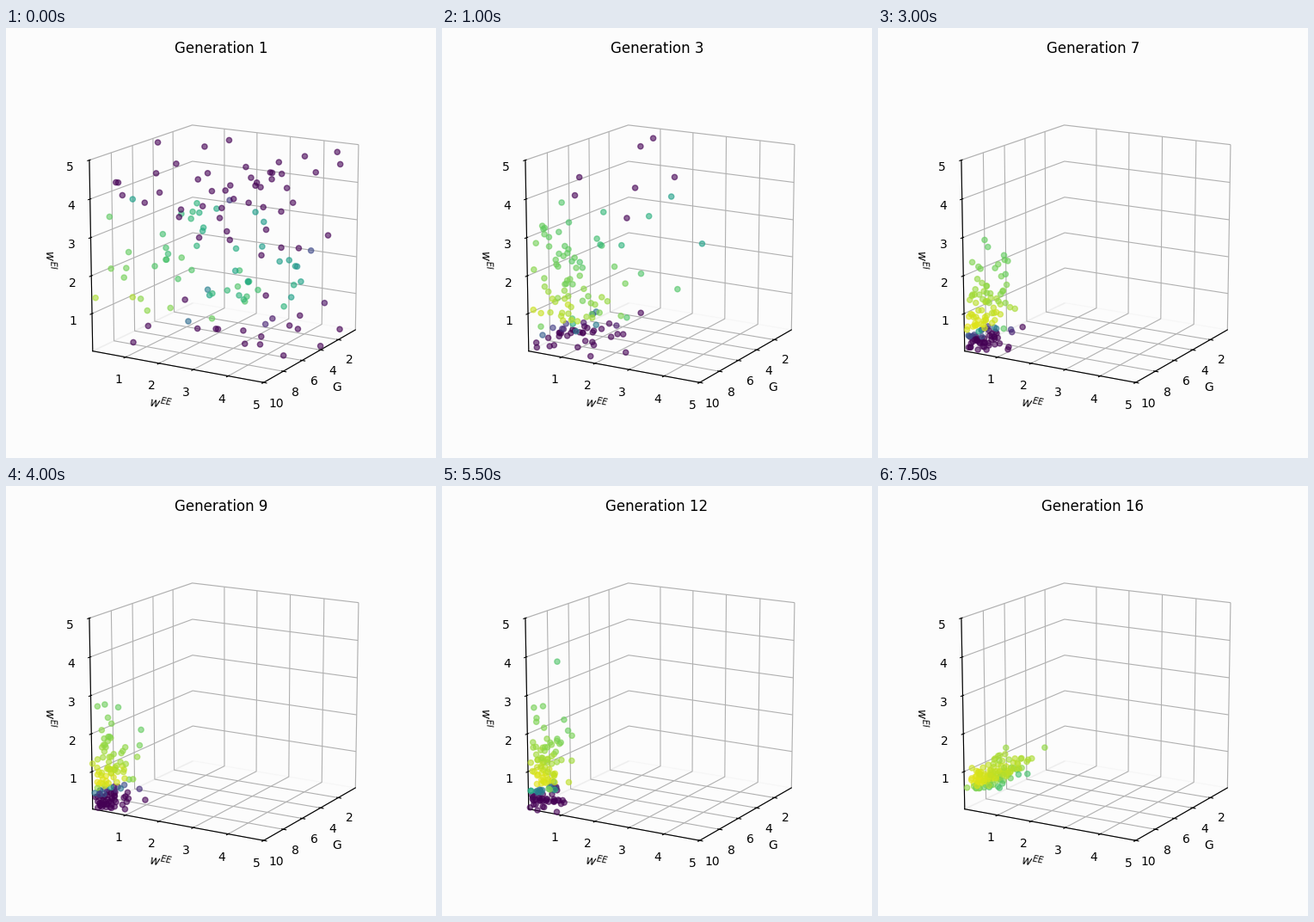
A matplotlib script that plays this animation: 500 px wide and 500 px high, repeating every 8 s.

```python
import numpy as np
import matplotlib.pyplot as plt
from matplotlib.animation import FuncAnimation

SIZE = 128          # individuals per generation
GENERATIONS = 16
BG = "#fcfcfc"


def stratified(rng, top):
    """Evenly spread random values from 0 to top."""
    return top * (rng.permutation(SIZE) + rng.random(SIZE)) / SIZE


def half_normal(rng, sigma):
    return np.abs(rng.normal(0, sigma, SIZE))


def threshold(ee):
    return .45 + .12 * ee


def population(t):
    """A uniform start contracts to the corner, then settles on the optimum."""
    rng = np.random.default_rng(40 + t)
    late = np.clip((t - 11) / 3, 0, 1)

    ee = half_normal(rng, .35 + 2.3 * np.exp(-t / 2))
    g = 10 - half_normal(rng, .8 + 2.8 * np.exp(-t / 3) + 1.3 * late)
    spread = (.8 + 1.3 * np.exp(-t / 4)) * (1 - .65 * late)
    ei = threshold(ee) + .07 * late + half_normal(rng, spread)

    low = rng.random(SIZE) < .4 * (1 - late)
    ei = np.where(low, threshold(ee) * rng.random(SIZE), ei)

    stray = rng.random(SIZE) < np.exp(-1.1 * t)
    ee = np.where(stray, stratified(rng, 5 * np.exp(-t / 4)), ee)
    g = np.where(stray, stratified(rng, 10), g)
    ei = np.where(stray, stratified(rng, 5), ei)
    return np.clip(g, 0, 10), np.clip(ee, 0, 5), np.clip(ei, 0, 5)


def fitness(g, ee, ei):
    """Peaks just above the threshold in w_EI, drops to zero on both sides."""
    excess = ei - threshold(ee)
    ceiling = 4.3 - .35 * ee - .05 * (10 - g)
    rise = np.clip((excess + .12) / .25, 0, 1)
    fall = np.clip((ceiling - ei) / .1, 0, 1)
    above = np.maximum(excess - .35, 0)
    top = .97 - .06 * ee - .014 * (10 - g)
    top -= .14 * (1 - np.exp(-1.3 * above)) + .02 * above
    return np.clip(top * rise * fall, 0, 1)


fig = plt.figure(figsize=(5, 5), dpi=100, facecolor=BG)
ax = fig.add_subplot(projection="3d", facecolor=BG)
ax.set_box_aspect((1, 1, 1), zoom=.85)
ax.view_init(elev=15, azim=30)
ax.set(xlim=(0, 10), ylim=(0, 5), zlim=(0, 5),
       xticks=range(2, 11, 2), yticks=range(1, 6), zticks=range(1, 6),
       xlabel="G", ylabel="$w^{EE}$", zlabel="$w^{EI}$",
       title="Generation 1")
for axis in (ax.xaxis, ax.yaxis, ax.zaxis):
    axis.pane.fill = False
fig.tight_layout()

dots = []


def update(t):
    while dots:
        dots.pop().remove()
    g, ee, ei = population(t)
    dots.append(ax.scatter(g, ee, ei, c=fitness(g, ee, ei), cmap="viridis",
                           vmin=0, vmax=1, s=20, alpha=.6, depthshade=False))
    ax.set_title(f"Generation {t + 1}")
    return dots


anim = FuncAnimation(fig, update, frames=GENERATIONS, interval=500,
                     init_func=lambda: update(0), repeat=True, repeat_delay=0)
plt.show()
```
